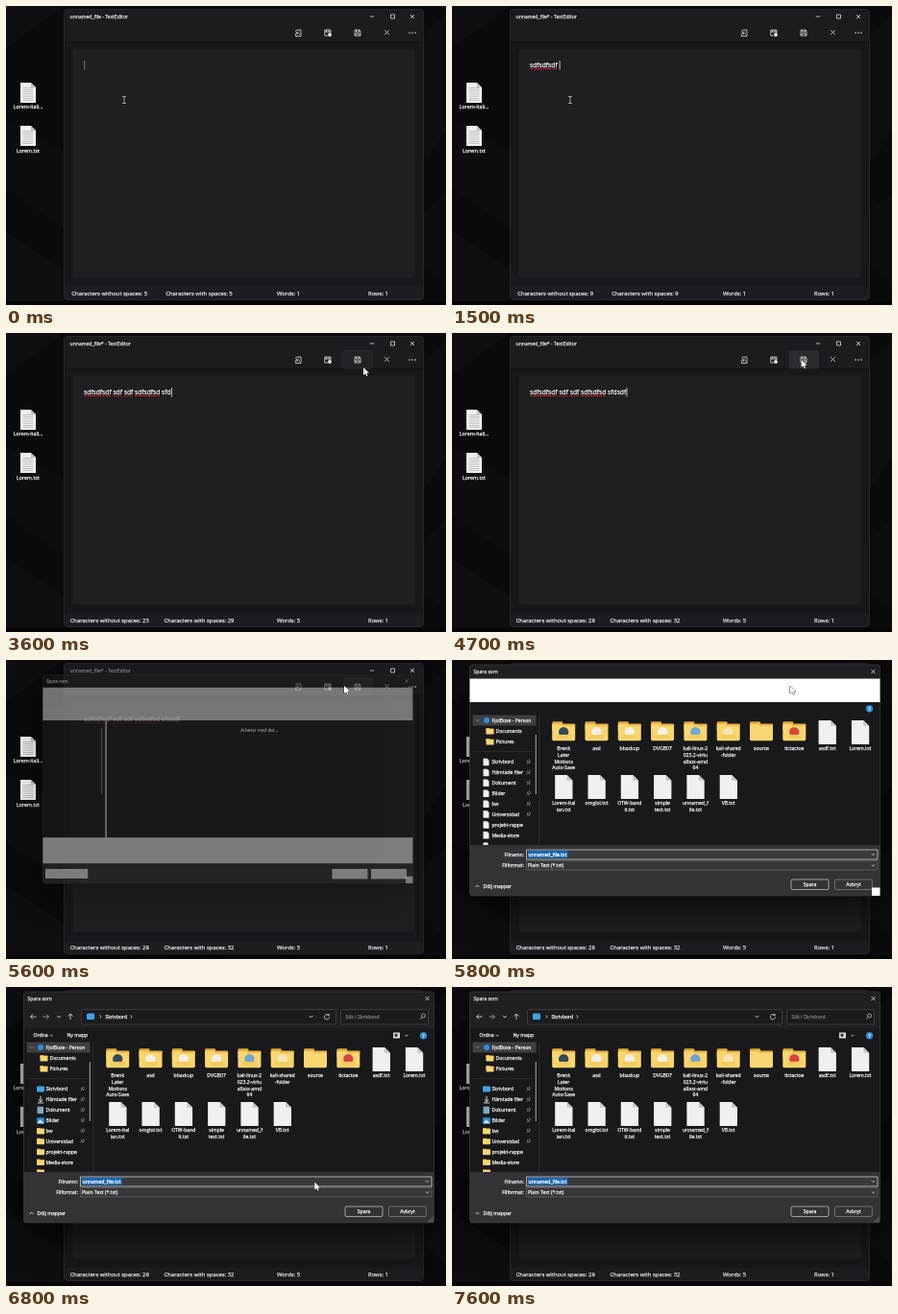
Animation of 458 by 312 pixels, one loop 8000 ms. Source, as an HTML page with a canvas:

```html
<!DOCTYPE html>
<html lang="sv">
<head>
<meta charset="utf-8">
<title>Text editor</title>
<style>
html, body { margin: 0; width: 100%; height: 100%; overflow: hidden; background: #0a0a0c; }
canvas { display: block; }
</style>
</head>
<body>
<canvas id="stage" width="458" height="312"></canvas>
<script>
const ctx = document.getElementById('stage').getContext('2d');
const LOOP = 8000, STEP = 100;
const FONT = '"Open Sans", "Noto Sans", sans-serif';
const TYPED = 'sdfsdfsdf sdf sdf sdfsdfsd sfdsdf';
// Moment of each key press, in tenths of a second.
const KEYS = [4, 6, 7, 9, 10, 11, 12, 13, 13, 15, 17, 19, 19, 20, 20, 21, 22, 26, 26, 29, 30,
  31, 31, 32, 33, 33, 34, 35, 35, 36, 37, 38, 39];
// Pointer path: time, x, y.
const PATH = [[0, 123, 98], [3200, 123, 98], [3400, 300, 60], [3500, 380, 34], [3600, 372, 36],
  [3800, 374, 32], [4300, 374, 28], [4800, 361, 28], [4900, 361, 28], [5100, 352, 27],
  [6000, 352, 27], [6300, 227, 129], [6500, 227, 131], [7000, 384, 252], [7200, 388, 245]];
const ITEMS = ['Brenk|Later|Motions|Auto-Save', 'asd', 'bbackup', 'DVGB07',
  'kali-linux-2|023.2-virtu|albox-amd|64', 'kali-shared|-folder', 'source', 'tictactoe',
  'asdf.txt', 'Lorem.txt', 'Lorem-ital|ian.txt', 'omglol.txt', 'OTW-band|it.txt',
  'simple|text.txt', 'unnamed_f|ile.txt', 'VB.txt'];
const THUMBS = ['#33495a', '#f1efe6', '#f1efe6', '#f1efe6', '#6fa6d6', '#f3e6b8', null, '#d8453a'];
const PLACES = ['Skrivbord', 'Hämtade filer', 'Dokument', 'Bilder', 'bw', 'Universidad',
  'projekt-rappe', 'Media-store'];

function rect(x, y, w, h, fill, radius = 0, stroke) {
  ctx.beginPath();
  ctx.roundRect(x, y, w, h, radius);
  if (fill) { ctx.fillStyle = fill; ctx.fill(); }
  if (stroke) { ctx.strokeStyle = stroke; ctx.lineWidth = .7; ctx.stroke(); }
}
function poly(points, fill) {
  ctx.beginPath();
  points.forEach(([x, y]) => ctx.lineTo(x, y));
  ctx.fillStyle = fill;
  ctx.fill();
}
function lines(x, y, d, color = '#ddd', width = .8) {
  ctx.save();
  ctx.translate(x, y);
  ctx.strokeStyle = color;
  ctx.lineWidth = width;
  ctx.stroke(new Path2D(d));
  ctx.restore();
}
function disc(x, y, r, fill) {
  ctx.beginPath();
  ctx.arc(x, y, r, 0, 7);
  ctx.fillStyle = fill;
  ctx.fill();
}
function text(s, x, y, size = 5.1, color = '#eee', align = 'left') {
  ctx.font = `${size}px ${FONT}`;
  ctx.textAlign = align;
  ctx.fillStyle = ctx.strokeStyle = color;
  ctx.lineWidth = .25;
  ctx.fillText(s, x, y + size * .36);
  ctx.strokeText(s, x, y + size * .36);
}
function page(x, y, w, h, ruled) {
  const f = w * .32;
  poly([[x, y], [x + w - f, y], [x + w, y + f], [x + w, y + h], [x, y + h]], '#f0f0f0');
  poly([[x + w - f, y], [x + w, y + f], [x + w - f, y + f]], '#c6c6c6');
  if (ruled) for (let i = 5; i < h - 2; i += 2.2) rect(x + 2.5, y + i, w - 5, .7, '#aaa');
}
function folder(x, y, w, h, thumb) {
  rect(x, y, w * .46, h * .5, '#e3ac3a', w * .06);
  rect(x, y + h * .12, w, h * .88, '#fad670', w * .06);
  rect(x + w * .4, y + h * .12, w * .6, h * .1, '#e8b545');
  if (thumb) {
    disc(x + w / 2, y + h * .54, h * .26, thumb);
    rect(x + w * .2, y + h * .68, w * .6, h * .2, '#f6cb5c');
  }
}

function pointerAt(t) {
  const i = PATH.findIndex(p => p[0] > t);
  if (i < 0) return PATH.at(-1).slice(1);
  const [t0, x0, y0] = PATH[i - 1], [t1, x1, y1] = PATH[i], k = (t - t0) / (t1 - t0);
  return [x0 + (x1 - x0) * k, y0 + (y1 - y0) * k];
}
function drawPointer(x, y, beam) {
  if (beam) return lines(x, y, 'M-2-3.5H2M0-3.5V3.5M-2 3.5H2', '#bbb');
  ctx.save();
  ctx.translate(x, y);
  const arrow = new Path2D('M0 0V8L2 6.3L3.3 9L4.5 8.4L3.3 5.8H6Z');
  ctx.strokeStyle = '#111';
  ctx.lineWidth = .8;
  ctx.stroke(arrow);
  ctx.fillStyle = '#fff';
  ctx.fill(arrow);
  ctx.restore();
}

function drawDesktop() {
  rect(0, 0, 458, 312, '#0a0a0c');
  poly([[0, 0], [60, 0], [0, 44]], '#0e0e11');
  poly([[0, 118], [60, 152], [60, 232], [0, 190]], '#0d0d10');
  poly([[0, 235], [60, 275], [60, 312], [0, 312]], '#0e0e11');
  poly([[435, 30], [458, 8], [458, 130], [435, 165]], '#0e0e11');
  poly([[435, 215], [458, 195], [458, 290], [435, 270]], '#0d0d10');
  rect(0, 308, 458, 4, '#050506');
  page(15, 80, 16, 21, true);
  page(15, 125, 16, 21, true);
  text('Lorem-itali...', 23, 105.5, 5.3, '#eee', 'center');
  text('Lorem.txt', 23, 151, 5.3, '#eee', 'center');
}

function drawEditor(t, [mx, my]) {
  const length = KEYS.filter(k => k * 100 <= t).length;
  const shown = TYPED.slice(0, length);
  const active = t < 5500;
  rect(60.5, 3.5, 374, 303, '#18171b', 3, '#303036');
  rect(61, 4, 373, 33, '#1c1b20', 3);
  rect(61, 37, 373, .7, '#111114');
  rect(61, 293, 373, 13, '#1d1c21', 3);
  rect(70, 45, 355, 238, '#1f1e22', 3, '#252429');

  text(`unnamed_file${length ? '*' : ''} - TextEditor`, 66.5, 11, 5.1, active ? '#ddd' : '#777');
  lines(381, 11, 'M-2.2 0H2.2');
  lines(402.5, 11, 'M-2-2H2V2H-2Z');
  lines(423, 11, 'M-2-2L2 2M2-2L-2 2');

  if (t >= 3500 && mx > 350 && mx < 383 && my < 38)
    rect(351, 18.5, 30.5, 18.5, t < 3800 ? '#222126' : '#2b2a2f', 2, '#302f35');
  lines(304, 28, 'M-1-3H3V3.5H-2.5V2M-3-1.5L-1-3M-3.5 1H0V-1.5M0 1L-2-1M1 1.3H2');
  lines(335, 28, 'M-3.2-3H3V0M-3.2-3V3H0M-3.2-1H3M-1.5-3V-1M1-3V-1');
  disc(337, 30, 2, '#ddd');
  lines(366, 28, 'M-3-3H2L3-2V3H-3ZM-1.5-3V-1H1.5V-3M-2 3V.8H2V3');
  lines(396.5, 27.5, 'M-2.3-2.3L2.3 2.3M2.3-2.3L-2.3 2.3');
  [420, 423, 426].forEach(x => disc(x, 28, .8, '#ddd'));

  const size = 6.7, left = 81;
  text(shown, left, 61.5, size, '#f0f0f0');
  const widthTo = n => ctx.measureText(TYPED.slice(0, n)).width;
  for (const { index, 0: word } of shown.matchAll(/\w+(?= )/g)) {
    const end = left + widthTo(index + word.length);
    let wave = '', up = 0;
    for (let x = left + widthTo(index); x < end; x += 1) wave += `${wave ? 'L' : 'M'}${x} ${65.2 + (up ^= 1) * .8}`;
    lines(0, 0, wave, '#d4202c', .9);
  }
  if (active) rect(left + widthTo(length) + .3, 57, .9, 9.5, length ? '#ccc' : '#888');

  // The counters describe the text before the latest key press.
  const counted = shown.slice(0, -1);
  const counts = length
    ? [counted.replaceAll(' ', '').length, counted.length, counted ? counted.split(' ').length : 0]
    : [5, 5, 1];
  ['Characters without spaces', 'Characters with spaces', 'Words', 'Rows'].forEach((label, i) =>
    text(`${label}: ${counts[i] ?? 1}`, [107.7, 201, 294, 387.5][i], 300, 5.9, '#ddd', 'center'));
}

function drawSkeleton() {
  const white = '#f6f6f6';
  rect(19, 19.5, 427, 38, white);
  rect(19, 193, 427, 30, white);
  rect(22, 229.5, 49, 11, white);
  rect(353, 229.5, 41, 11.5, white);
  rect(398, 229.5, 41, 11.5, white);
  rect(438, 238, 8, 8, white);
  rect(91, 58, 1.8, 135, white);
  rect(86.5, 66, 1, 77, '#999');
  text('Arbetar med det...', 269, 68.5, 5.1, '#ddd', 'center');
}

function drawHeader() {
  lines(29, 31, 'M3 0H-3M-.5-2.5L-3 0L-.5 2.5');
  lines(42, 31, 'M-3 0H3M.5-2.5L3 0L.5 2.5', '#aaa');
  lines(55.5, 31, 'M-1.8-1L0 1L1.8-1');
  lines(67.5, 31, 'M0 3V-3M-2.5-.5L0-3L2.5-.5');
  rect(79, 23.5, 265, 15.5, '#1c1c1f', 1, '#48484d');
  rect(349, 23.5, 91, 15.5, '#1c1c1f', 1, '#48484d');
  rect(84.5, 27.5, 8, 6.5, '#3fa4e6', 1);
  lines(99, 31, 'M-.8-1.6L.8 0L-.8 1.6');
  text('Skrivbord', 104, 31);
  lines(131, 31, 'M-.8-1.6L.8 0L-.8 1.6');
  lines(318, 31, 'M-1.8-1L0 1L1.8-1');
  lines(334.5, 31, 'M2-1.5A2.6 2.6 0 1 0 2.6.4M2.2-3V-1.3H.5');
  text('Sök i Skrivbord', 354, 31, 5.1, '#777');
  lines(434, 31, 'M3-1A2 2 0 1 0-1-1A2 2 0 1 0 3-1M-.4.4L-2.5 2.5', '#bbb');
  text('Ordna', 29, 50.5);
  lines(47.5, 50.5, 'M-1.5-.7L0 .8L1.5-.7');
  text('Ny mapp', 64, 50.5);
  rect(403.5, 47.5, 7, 6, '#ddd', .5);
  rect(405, 48.8, 3, 3, '#333');
  lines(417.5, 50.5, 'M-1.5-.7L0 .8L1.5-.7');
}

function drawSidebar(ready) {
  rect(22, 57.5, 66, 11, '#3f3f43');
  lines(27, 63, 'M-1.6-.8L0 .8L1.6-.8', '#999');
  disc(36.5, 63, 3, '#2b8fe0');
  text('FjolBoxe - Person', 42, 63);
  folder(36, 71, 8, 6.5);
  text('Documents', 46, 74.5);
  folder(36, 82, 8, 6.5);
  text('Pictures', 46, 85.5);
  rect(22, 95.5, 64, .6, '#3b3b3f');
  PLACES.forEach((name, i) => {
    const y = 106.5 + i * 10.9;
    if (!ready) page(33, y - 3.7, 6, 7.5);
    else if (i == 0) rect(32.5, y - 3, 8, 6, '#3fa4e6', 1);
    else if (i == 1) lines(36.5, y, 'M0-3.5V2M-2.3 0L0 2.2L2.3 0M-3 3.5H3', '#ddd', 1);
    else if (i == 2) rect(33, y - 3.5, 6.5, 7.5, '#7fa9c4', 1);
    else if (i == 3) { rect(32.5, y - 3, 8, 6.5, '#2f86cf', 1); poly([[33, y + 3], [36, y - 1], [40, y + 3]], '#cfeaff'); }
    else folder(32.5, y - 3.2, 8, 6.5);
    text(name, 42, y);
    if (i < 6) lines(80, y, 'M-2 2L0 0M-1.5-1L1 1.5L1.3.2L2.3-1L1-2.2L-.2-1.2Z', '#aaa', .6);
  });
  if (ready) folder(32.5, 190.5, 8, 2.5);
  else rect(33, 190.5, 5, 2.5, '#eee');
  rect(87.3, 78, 1, 62, '#aaa');
  rect(91, 58, .7, 135, '#333337');
}

function drawFiles(mx, my) {
  ITEMS.forEach((label, i) => {
    const col = i % 10, row = Math.floor(i / 10);
    const x = 116.7 + col * 34.3, y = row * 57;
    const hover = Math.abs(mx - x) < 17 && my > y + 61 && my < y + 104;
    if (hover) rect(x - 17, y + 61, 34, 43, '#4a4a4d');
    if (i < 8) folder(x - 12, y + 64.3, 24, 20, THUMBS[i]);
    else page(x - 9, y + 63, 18.3, 25);
    label.split('|').forEach((s, n) => text(s, x, y + 92.3 + n * 6.7, 5.1, '#eee', 'center'));
  });
}

function drawFooter(t) {
  text('Filnamn:', 75.5, 203, 5.1, '#eee', 'right');
  text('Filformat:', 75.5, 214, 5.1, '#eee', 'right');
  rect(78, 198, 365.5, 10, '#39393b', 0, '#d8dde2');
  rect(78, 209.5, 365.5, 9.5, '#373739', 0, '#68686c');
  rect(79.5, 199, 41.5, 7.5, '#1769b5');
  text('unnamed_file.txt', 80, 202.8, 5.1, '#fff');
  if (t >= 6900 && t < 7400) rect(121, 199, .8, 7.5, '#eee');
  text('Plain Text (*.txt)', 79.5, 214.2);
  [203, 214.3].forEach(y => lines(439, y, 'M-1.6-.8L0 .8L1.6-.8'));
  lines(27, 236, 'M-1.8 1L0-1L1.8 1');
  text('Dölj mappar', 33, 236);
  rect(353.5, 229, 39, 10.5, '#333335', 1.5, '#d0d0d2');
  rect(399, 229, 38.8, 10.5, '#333335', 1.5, '#88888c');
  text('Spara', 373, 234, 5.1, '#eee', 'center');
  text('Avbryt', 418.4, 234, 5.1, '#eee', 'center');
}

function drawDialog(t, [mx, my]) {
  const shown = Math.min(1, (t - 5500) / 240 + .005);
  if (shown <= 0) return;
  const scale = .83 + .17 * shown, ready = t >= 6000;
  ctx.save();
  ctx.globalAlpha = shown;
  ctx.translate(232 - 2 * (1 - shown), 125.5 - 2 * (1 - shown));
  ctx.scale(scale, scale);
  ctx.translate(-232.5, -125.5);
  ctx.shadowColor = 'rgba(0, 0, 0, .75)';
  ctx.shadowBlur = 40;
  ctx.shadowOffsetY = 12;
  rect(19, 5, 427, 241, '#202022', 2);
  ctx.shadowColor = 'transparent';
  rect(19.5, 43.5, 426, 149.5, '#19191b');
  rect(19, 193, 427, 53, '#333335', [0, 0, 2, 2]);
  rect(19, 5, 427, 241, null, 2, '#3a3a3e');
  text('Spara som', 23, 12, 5.1, '#ddd');
  lines(439, 12, 'M-2-2L2 2M2-2L-2 2');
  if (t < 5800) drawSkeleton();
  else {
    if (ready) drawHeader();
    else rect(19, 19.5, 427, 24.5, '#fff');
    disc(435, 50.8, 3.7, '#2b8ac9');
    text('?', 435, 50.8, 5.5, '#fff', 'center');
    drawSidebar(ready);
    drawFiles(mx, my);
    drawFooter(t);
    if (!ready) rect(437.5, 237.5, 8.5, 8.5, '#fff');
    else [[444, 240], [444, 242], [444, 244], [442, 242], [442, 244], [440, 244]]
      .forEach(([x, y]) => rect(x, y, 1, 1, '#999'));
  }
  ctx.restore();
}

function draw(now) {
  const t = Math.floor(now % LOOP / STEP) * STEP;
  const pointer = pointerAt(t);
  drawDesktop();
  drawEditor(t, pointer);
  drawDialog(t, pointer);
  if (t < 7600) drawPointer(...pointer, t < 5500 && pointer[1] > 45);
  requestAnimationFrame(draw);
}
requestAnimationFrame(draw);
</script>
</body>
</html>
```
